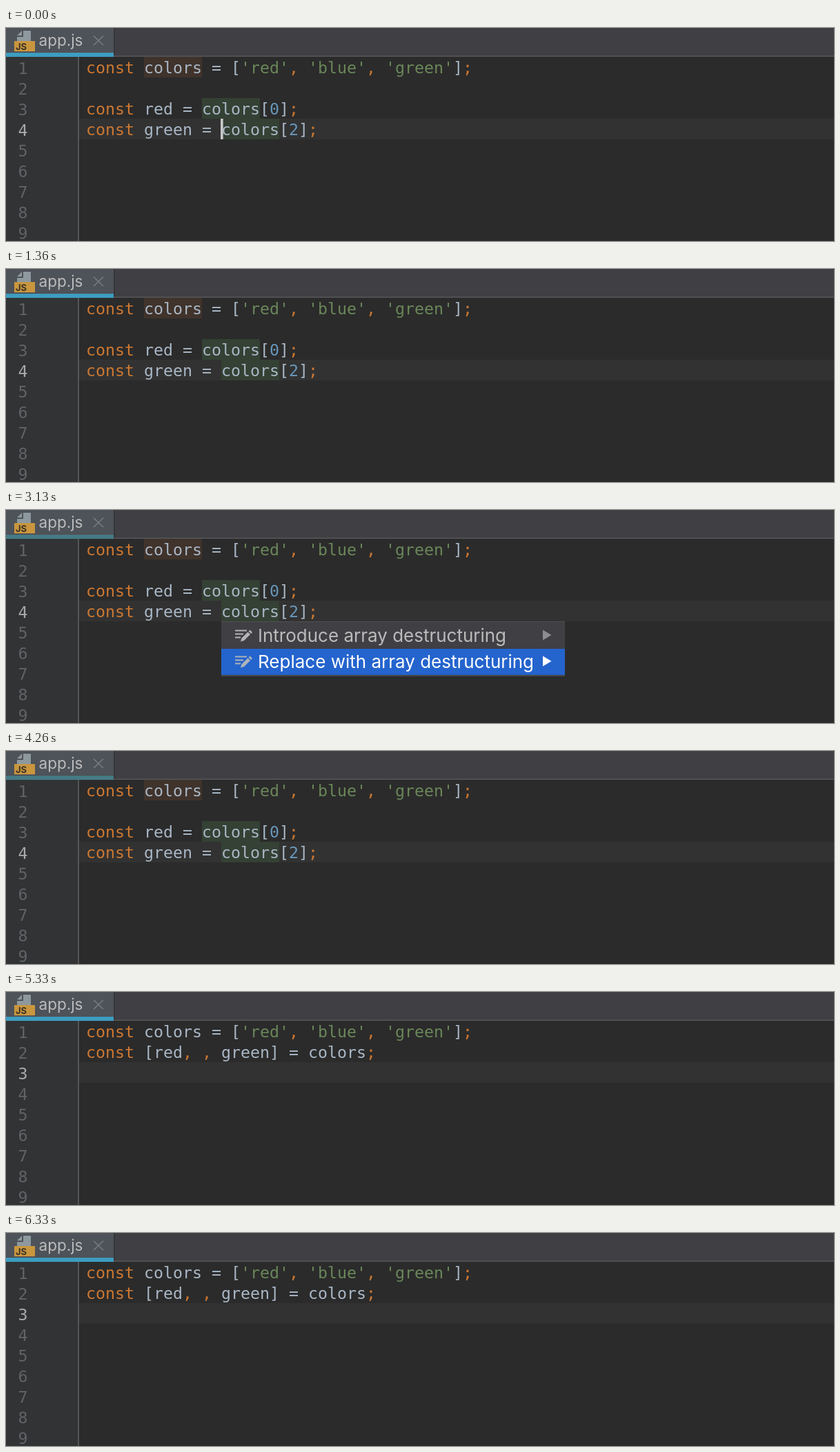
These frames come from a looping animation (1200x310 px, 6360 ms). An HTML page:

```html
<!DOCTYPE html>
<html lang="en">
<head>
<meta charset="utf-8">
<title>Array destructuring</title>
<style>
  html, body { margin: 0; width: 100%; height: 100%; overflow: hidden; background: #2b2b2b; }
  svg { display: block; width: 100%; height: 100%; }
  text { white-space: pre; }
  .code { font: 23.25px "DejaVu Sans Mono", monospace; fill: #a9b7c6; }
  .ui { font: 26px Inter, sans-serif; }
  .key { fill: #cc7832; }
  .str { fill: #6a8759; }
  .num { fill: #6897bb; }
</style>
</head>
<body>
<svg id="stage" viewBox="0 0 1200 310"></svg>
<script>
const LOOP = 6360;
const ROW = 30, TOP = 42, LEFT = 116, CHAR = 14;
const stage = document.getElementById('stage');

const before = [
  "const colors = ['red', 'blue', 'green'];",
  '',
  'const red = colors[0];',
  'const green = colors[2];'
];
const after = [before[0], 'const [red, , green] = colors;'];
const actions = ['Introduce array destructuring', 'Replace with array destructuring'];

const rowY = line => TOP + (line - 1) * ROW;
const rect = (x, y, w, h, fill) =>
  `<rect x="${x}" y="${y}" width="${w}" height="${h}" fill="${fill}"/>`;
const path = (d, fill) => `<path d="${d}" fill="${fill}"/>`;
const stroke = (d, color, width) =>
  `<path d="${d}" fill="none" stroke="${color}" stroke-width="${width}"/>`;

function paint(source) {
  const span = (kind, s) => `<tspan class="${kind}">${s}</tspan>`;
  return source.replace(/'\w+'|\bconst\b|\d+|[,;]/g, s =>
    span(s[0] === "'" ? 'str' : /\d/.test(s) ? 'num' : 'key', s));
}

function codeLines(lines) {
  return lines.map((s, i) =>
    `<text class="code" x="${LEFT}" y="${rowY(i + 1) + 24}">${paint(s)}</text>`).join('');
}

// Highlight behind the six letters of "colors"
const usage = (line, column, fill) =>
  rect(LEFT + column * CHAR, rowY(line), 6 * CHAR, ROW, fill);

function gutter(current) {
  let out = rect(0, TOP, 104, 268, '#313335') + rect(104, TOP, 2, 268, '#555557');
  for (let n = 1; n <= 9; n++) {
    const fill = n === current ? '#a9a9a9' : '#606366';
    out += `<text class="code" x="17.5" y="${rowY(n) + 24.5}" style="fill:${fill}">${n}</text>`;
  }
  return out;
}

function tabBar(focused) {
  return rect(0, 0, 1200, 40, '#403f44') +
    rect(0, 40, 1200, 2, '#505052') +
    rect(0, 0, 156, 36, '#4e5259') +
    rect(156, 0, 2, 40, '#37373a') +
    rect(0, 36, 156, 6, focused ? '#3d9dc0' : '#457a84') +
    path('M25 4H36V19H16V13H25Z', '#8d999f') +
    path('M23 4V11H16Z', '#8d999f') +
    rect(12, 19, 30, 15, '#c9963e') +
    '<text x="14" y="32" font-family="Inter, sans-serif" font-size="13" font-weight="700" fill="#3a3228">JS</text>' +
    '<text class="ui" x="47.5" y="26" style="font-size:22.5px" fill="#bbbbbb">app.js</text>' +
    stroke('M127 11.5L141 25M141 11.5L127 25', '#797c80', 1.6);
}

function menuItem(label, i, selected) {
  const y = 164 + i * 38;
  const icon = selected ? '#aeb3bb' : '#b4b5b7';
  return (selected ? rect(312, y, 498, 38, '#2464cd') : '') +
    `<g transform="translate(332 ${y})">` +
    stroke('M0 11.5H17M0 16.5H12M0 21.5H8', icon, 2) +
    path('M8 27.5L9.5 22.5L18.5 13.5L22 17L13 26Z', icon) +
    path('M19.6 12.4L21.5 10.5L25 14L23.1 15.9Z', icon) + '</g>' +
    `<text class="ui" x="365" y="${y + 28}" fill="${selected ? '#ffffff' : '#bbbbbb'}">${label}</text>` +
    path(`M778 ${y + 10.5}L790.5 ${y + 18}L778 ${y + 25.5}Z`, selected ? '#ffffff' : '#8e8e91');
}

function menu(selected) {
  return rect(312, 162, 498, 80, '#505052') +
    rect(312, 163, 498, 78, '#403f44') +
    actions.map((label, i) => menuItem(label, i, i === selected)).join('');
}

function stateAt(t) {
  const within = (a, b) => t >= a && t < b;
  return {
    done: t >= 4330,
    focused: !within(1800, 4330),
    written: t < 4600,
    caret: t < 330 || within(860, 1360) || within(4330, 5330) || within(5830, 6330),
    selected: within(1800, 3130) ? 0 : within(3130, 4260) ? 1 : -1
  };
}

function draw(s) {
  const line = s.done ? 3 : 4;
  let out = rect(0, 0, 1200, 310, '#2b2b2b') + gutter(line) +
    rect(106, rowY(line), 1094, ROW, '#323232') + tabBar(s.focused);
  if (s.written) out += usage(1, 6, '#40332b');
  if (!s.done) out += usage(3, 12, '#344134') + usage(4, 14, '#344134');
  out += codeLines(s.done ? after : before);
  if (s.caret) out += rect(s.done ? 116 : 311, rowY(line), 3.7, ROW, '#c8c8c8');
  if (s.selected >= 0) out += menu(s.selected);
  return out;
}

let shown = '';
const start = performance.now();
function tick() {
  const s = stateAt((performance.now() - start) % LOOP);
  const key = JSON.stringify(s);
  if (key !== shown) {
    stage.innerHTML = draw(s);
    shown = key;
  }
  requestAnimationFrame(tick);
}
tick();
</script>
</body>
</html>
```
